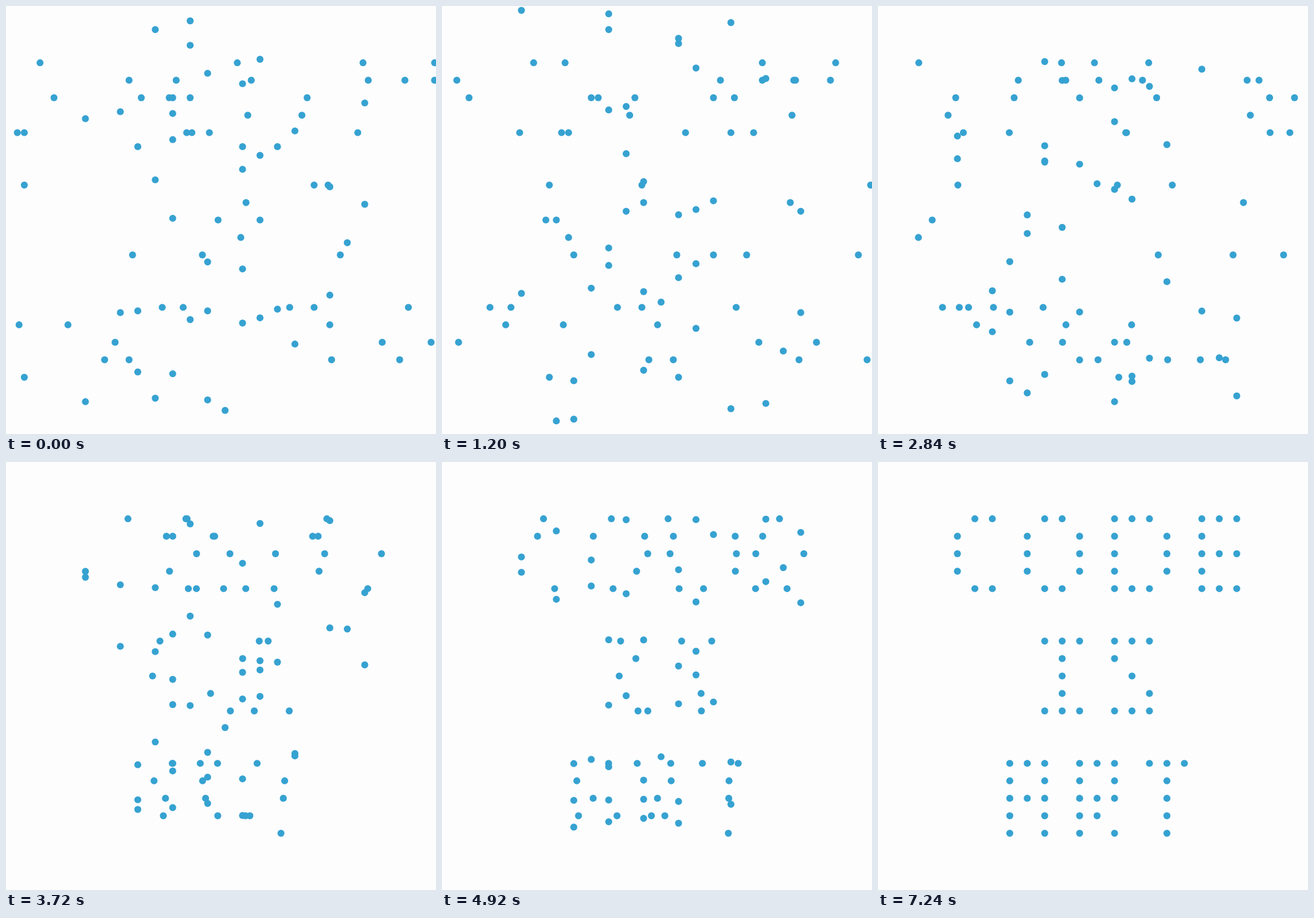
Animation of 750 by 746 pixels, one loop 8.34 s. Source, as an HTML page with a canvas:

```html
<!DOCTYPE html>
<html lang="en">
<head>
<meta charset="utf-8">
<style>
  html, body { margin: 0; width: 100%; height: 100%; overflow: hidden; background: #fdfdfe; }
  canvas { display: block; }
</style>
</head>
<body>
<canvas id="stage" width="750" height="746"></canvas>
<script>
const ctx = document.getElementById('stage').getContext('2d');
const LOOP = 8340, SETTLED = 7240, STEP = 20;
const UNIT = 3.045, LEFT = 15.2, TOP = 6.1, RADIUS = 6.1;
const SPAN = 241;          // distance between the walls, in units
const RELEASE = 136;       // tick at which dots start homing
const KEEP = 1 - 1 / 36;   // share of the offset left after each tick

// Each mark is a dot's home; the mark shows the axis it travels on.
const ROWS = [
  ' -|  -|  -||  |-|',
  '-   -  - -  - -',
  '|   |  - -  - -|-',
  '|   |  - |  - |',
  ' -|  -|  -|-  --|',
  '', '',
  '     |-| -|-',
  '      -  |',
  '      -   |',
  '      |    -',
  '     |-- |-|',
  '', '',
  '   ||- -|- -|-',
  '   - | | -  -',
  '   |-| |-|  -',
  '   - - --   |',
  '   | | | |  -'
];

// Phase of every dot on its back-and-forth track at the release tick.
const PHASES = [
  377, 309, 121, 440, 8, 441, 214, 34, 335, 189,
  228, 377, 359, 70, 271, 338,
  393, 358, 158, 450, 224, 63, 269, 236,
  73, 233, 453, 438, 269, 299,
  234, 194, 141, 129, 137, 256, 34, 421, 247, 247,
  85, 446, 394, 315, 219, 130,
  268, 284,
  19, 107,
  156, 6,
  409, 243, 322, 57, 203, 446,
  308, 124, 392, 446, 388, 39, 460, 327, 51,
  105, 16, 172, 437, 138,
  214, 379, 210, 280, 78, 227, 346,
  356, 187, 201, 317, 66,
  343, 76, 445, 93, 130
];

const dots = [];
ROWS.forEach((row, r) => [...row].forEach((mark, c) => {
  if (mark === ' ') return;
  dots.push({
    x: 40.5 + 10 * c,
    y: 30.5 + 10 * r,
    axis: mark === '-' ? 'x' : 'y',
    phase: PHASES[dots.length] + 0.5
  });
}));

// Pace of the simulation: [ms, tick]
const PACE = [[0, 0], [1200, 62], [2080, 106], [2840, 139], [SETTLED, 359]];

function tickAt(ms) {
  const i = Math.max(1, PACE.findIndex(p => ms <= p[0]));
  const [t0, n0] = PACE[i - 1], [t1, n1] = PACE[i];
  return n0 + (n1 - n0) * (ms - t0) / (t1 - t0);
}

function bounce(phase) {
  const q = ((phase % (2 * SPAN)) + 2 * SPAN) % (2 * SPAN);
  return q < SPAN ? q : 2 * SPAN - q;
}

function place(dot, tick, done) {
  const home = dot[dot.axis];
  if (done) return home;
  const pos = bounce(dot.phase + Math.min(0, tick - RELEASE));
  return home + (pos - home) * KEEP ** Math.max(0, tick - RELEASE);
}

function draw(ms) {
  const done = ms >= SETTLED;
  const tick = done ? 0 : tickAt(ms);
  ctx.fillStyle = '#fdfdfe';
  ctx.fillRect(0, 0, 750, 746);
  ctx.fillStyle = '#36a2d1';
  for (const dot of dots) {
    const p = { x: dot.x, y: dot.y };
    p[dot.axis] = place(dot, tick, done);
    ctx.beginPath();
    ctx.arc(LEFT + p.x * UNIT, TOP + p.y * UNIT, RADIUS, 0, 2 * Math.PI);
    ctx.fill();
  }
}

const start = performance.now();
function frame() {
  const ms = (performance.now() - start) % LOOP;
  draw(Math.floor(ms / STEP) * STEP);
  requestAnimationFrame(frame);
}
frame();
</script>
</body>
</html>
```
